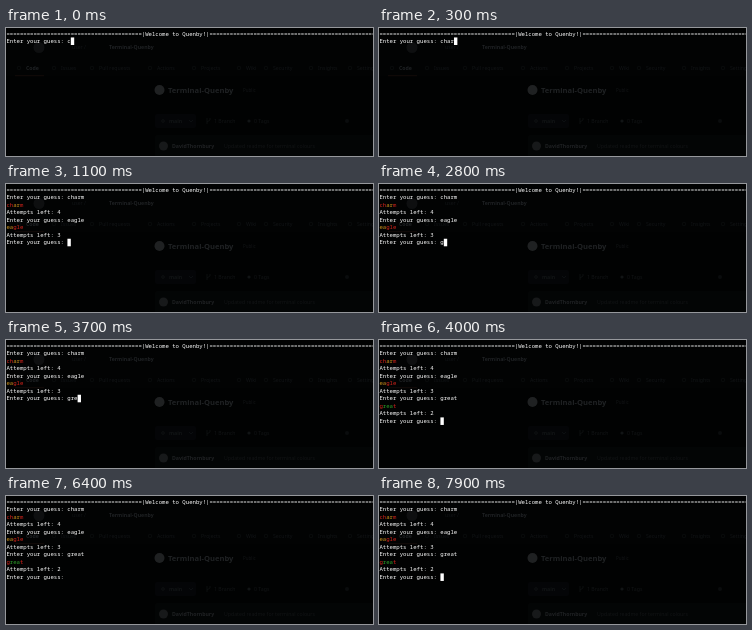
Animation, 367 px wide and 128 px high, one loop 8000 ms. Source, as an HTML page:

```html
<!DOCTYPE html>
<html lang="en">
<head>
<meta charset="utf-8">
<title>Word guessing in a terminal</title>
<style>
  html, body { margin: 0; width: 100%; height: 100%; overflow: hidden; background: #010202; }
  svg { display: block; width: 367px; height: 128px; }
  #page { font: 5.2px "Noto Sans", sans-serif; fill: #1b1e20; opacity: .65; }
  #page .strong { font-weight: 700; fill: #303336; }
  #term { font: 5.65px "Noto Sans Mono", monospace; fill: #fff; white-space: pre; }
</style>
</head>
<body>
<svg viewBox="0 0 367 128">
  <g id="page">
    <rect y="9" width="367" height="39" fill="#030405"/>
    <path d="M9 47.7H38" stroke="#1c100c"/>
    <circle cx="33" cy="19.5" r="5.5" fill="#151718"/>
    <text x="66" y="21">user  /</text>
    <text class="strong" x="103" y="21">Terminal-Quenby</text>
    <g id="tabs"></g>
    <circle cx="153.5" cy="62" r="5" fill="#303234"/>
    <text class="strong" x="162" y="65" font-size="7.6">Terminal-Quenby</text>
    <text x="237" y="64" font-size="4.5">Public</text>
    <rect x="149" y="86" width="41" height="14" rx="2" fill="#06080a"/>
    <circle cx="157" cy="93" r="1.3" fill="none" stroke="#1c2020" stroke-width=".7"/>
    <text x="163" y="95" font-weight="700">main</text>
    <path d="M183 92l2 2 2-2M201 90v6m3-6v2l-3 2" fill="none" stroke="#1b1e20" stroke-width=".7"/>
    <text x="208" y="95">1 Branch</text>
    <circle cx="243" cy="93" r="1.6"/>
    <text x="248" y="95">0 Tags</text>
    <circle cx="341" cy="93" r="2" fill="#101213"/>
    <rect x="149" y="107" width="230" height="30" rx="2" fill="#050707"/>
    <circle cx="157.5" cy="118" r="4.5" fill="#242627"/>
    <text class="strong" x="166" y="120">DavidThornbury</text>
    <text x="218" y="120">Updated readme for terminal colours</text>
  </g>
  <g id="term"></g>
</svg>
<script>
const CELL = 3.39, ROW = 7.55, LEFT = .4, TOP = 1.9, LOOP = 8000;
const COLORS = { r: '#d8241c', y: '#d0941c', g: '#2fa32b' };
const PROMPT = 'Enter your guess: ';
const TITLE = '='.repeat(40) + '|Welcome to Quenby!|' + '='.repeat(50);

const rounds = [
  { word: 'charm', marks: 'rryyr', keys: [0, 100, 200, 300], enter: 400 },
  { word: 'eagle', marks: 'yyrrr', keys: [700, 800, 900, 1000], enter: 1100 },
  { word: 'great', marks: 'rgggr', keys: [2800, 3000, 3100, 3800, 3900], enter: 4000 }
];
// Intervals in which the cursor is dark
const dark = [[1600, 2100], [2500, 2800], [3600, 3700], [4500, 5000],
              [5400, 5900], [6400, 6900], [7400, 7900]];

const tabs = [['Code', 20], ['Issues', 55], ['Pull requests', 93], ['Actions', 151],
              ['Projects', 195], ['Wiki', 240], ['Security', 267], ['Insights', 312], ['Settings', 351]];
document.getElementById('tabs').innerHTML = tabs.map(([name, x], i) =>
  `<circle cx="${x - 7}" cy="40" r="1.8" fill="none" stroke="#141718" stroke-width=".7"/>
   <text x="${x}" y="42" ${i ? '' : 'class="strong"'}>${name}</text>`).join('');

const colored = ({ word, marks }) => [...word].map((c, i) =>
  `<tspan fill="${COLORS[marks[i]]}">${c}</tspan>`).join('');

function screen(t) {
  const lines = [TITLE];
  let typed = '';
  for (const [i, round] of rounds.entries()) {
    if (t < round.enter) {
      typed = round.word.slice(0, round.keys.filter(k => k <= t).length);
      break;
    }
    lines.push(PROMPT + round.word, colored(round), `Attempts left: ${4 - i}`);
  }
  lines.push(PROMPT + typed);
  const text = lines.map((s, r) =>
    `<text x="${LEFT}" y="${TOP + r * ROW + 5.6}" xml:space="preserve">${s}</text>`).join('');
  if (dark.some(([from, to]) => t >= from && t < to)) return text;
  const x = LEFT + (PROMPT.length + typed.length) * CELL;
  const y = TOP + (lines.length - 1) * ROW;
  return text + `<rect x="${x}" y="${y}" width="${CELL}" height="${ROW}"/>`;
}

const term = document.getElementById('term');
const start = performance.now();
let shown;
function draw() {
  const next = screen((performance.now() - start) % LOOP);
  if (next !== shown) term.innerHTML = shown = next;
  requestAnimationFrame(draw);
}
draw();
</script>
</body>
</html>
```
